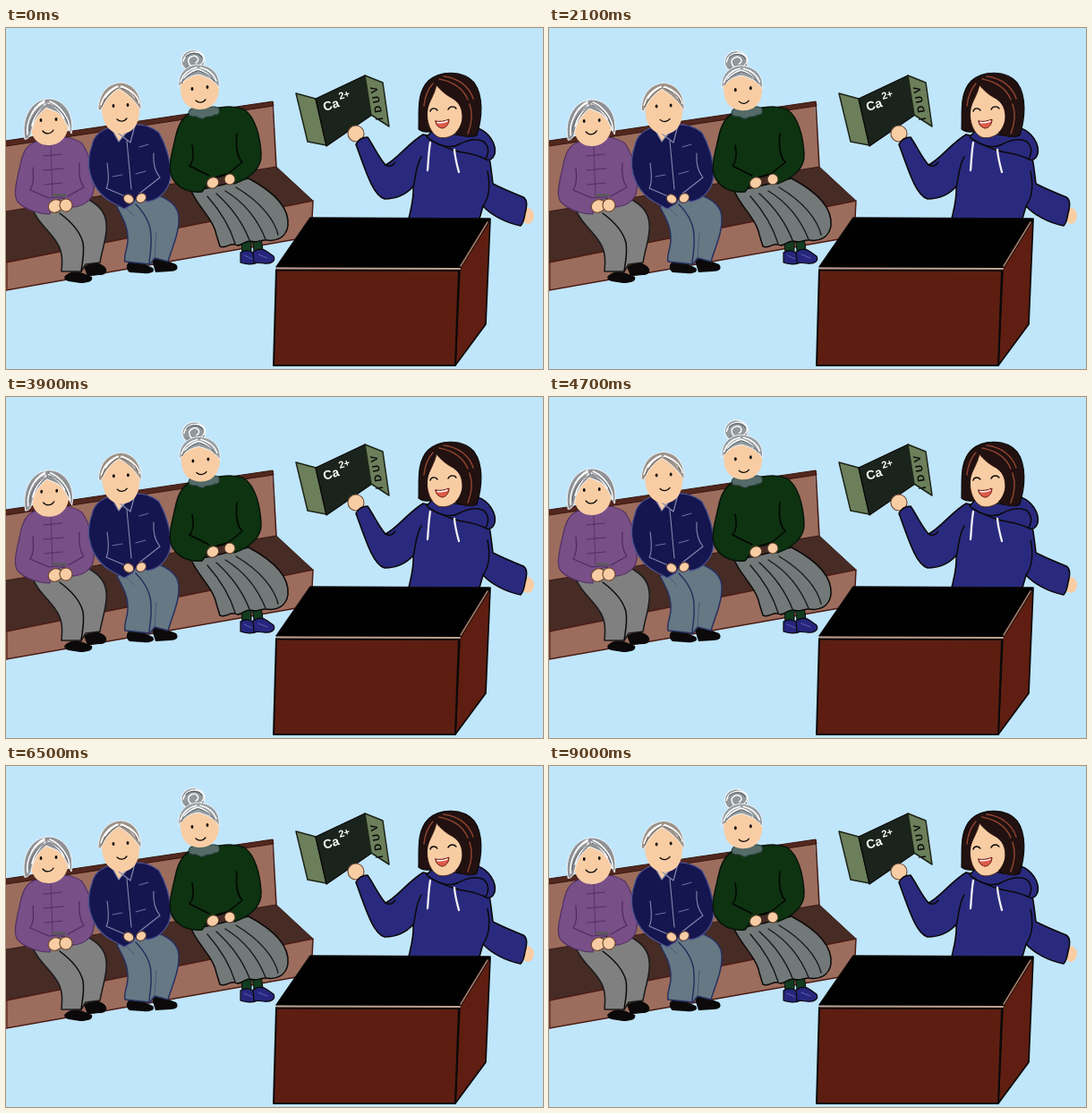
These frames come from a looping animation (600x381 px, 9.1 s). An HTML page with a canvas:

```html
<!DOCTYPE html>
<html lang="en">
<head>
<meta charset="utf-8">
<title>Talk</title>
<style>
html, body { margin: 0; width: 100%; height: 100%; overflow: hidden; background: #c0e6fc; }
canvas { display: block; width: 600px; height: 381px; }
</style>
</head>
<body>
<canvas id="stage" width="600" height="381"></canvas>
<script>
const ctx = document.getElementById('stage').getContext('2d');
const LOOP = 9100, STEP = 100, BEAT = 1075;
const SKIN = '#f9cda4', INK = '#0b0909', WOOD = '#9c6d5d', SEAT = '#472b25', OLIVE = '#6b7f5b';
const NAVY = '#15154f', HOODIE = '#292a7e';

const cache = {};
const path = d => cache[d] || (cache[d] = new Path2D(d));

function shape(d, fill, ink, w = 1.5) {
  if (fill) { ctx.fillStyle = fill; ctx.fill(path(d)); }
  if (ink) { ctx.strokeStyle = ink; ctx.lineWidth = w; ctx.stroke(path(d)); }
}
const line = (d, ink = INK, w = 1.3) => shape(d, null, ink, w);

function dot(x, y, rx, ry = rx, fill = INK, ink = null, turn = 0) {
  ctx.beginPath();
  ctx.ellipse(x, y, rx, ry, turn, 0, 7);
  ctx.fillStyle = fill;
  ctx.fill();
  if (ink) { ctx.strokeStyle = ink; ctx.lineWidth = 1.2; ctx.stroke(); }
}

// Rises from a to peak b, falls back at c, zero elsewhere
function bump(u, a, b, c) {
  if (u < a || u > c) return 0;
  return u < b ? (u - a) / (b - a) : (c - u) / (c - b);
}

function shifted(x, y, draw) {
  ctx.save();
  ctx.translate(x, y);
  draw();
  ctx.restore();
}

function bench() {
  shape('M0,129 L297,85 L302,156 L0,207Z', WOOD);
  shape('M0,126 L298,82 L299,87 L0,132Z', '#52281f', '#38160f', 1);
  line('M298,83 L302,156', '#4a1c14', 1.6);
  shape('M0,205 L302,155 L343,193 L0,262Z', SEAT, '#391a14', 1);
  shape('M0,262 L343,193 L341,233 L0,293Z', WOOD);
  line('M0,262 L343,193 L341,233 L0,293', '#4d1c15', 1.5);
  line('M1,262 L1,292', '#572019', 1.2);
}

function bodyLeft() {
  shape('M66,277 C71,272 78,271 86,274 L96,278 C98,283 91,285 83,285 L70,283 C66,282 64,279 66,277Z', INK);
  shape('M87,267 C94,262 101,261 106,264 C115,268 114,276 105,276 L91,277Z', INK);
  shape('M29,200 C34,216 47,225 55,237 C64,249 63,261 62,272 L84,272 L89,264 L105,262 C108,244 114,231 112,218 C111,205 103,198 93,192 L60,190Z', '#808081', '#1c1c1c', 1.6);
  line('M60,207 C75,218 83,228 86,240 C88,252 85,263 84,272', INK, 1.5);
  shape('M34,127 C22,130 18,141 15,157 C11,174 8,188 13,194 C22,204 39,208 49,208 L52,193 L65,190 L71,200 C84,201 97,193 98,181 C100,166 95,144 85,129 C80,125 73,123 66,122 L45,131Z', '#784f87', '#513063', 1.2);
  line('M30,156 C31,168 31,175 27,181 L48,190 M82,151 C81,164 83,173 87,178 L69,188 M48,190 L66,188', '#4d2a60', 1.2);
  line('M50,131 L52,188', '#5a346b', 1);
  line('M42,143 L62,141 M42,159 L64,157 M43,175 L63,173', '#53305f', 1.2);
  dot(55, 199, 8, 7, SKIN, '#70472f', -.5);
  dot(67, 198, 7, 7, SKIN, '#70472f', .4);
  line('M53,187 L66,187', '#5a5a5a', 3);
}

function headLeft() {
  shape('M28,105 C26,120 34,131 47,131 C61,131 70,121 70,105 C64,94 53,88 45,88 C37,90 30,97 28,105Z', SKIN);
  shape('M21,124 C16,100 29,80 47,79 C66,79 77,98 73,118 C69,112 67,101 57,94 L45,89 C36,96 30,105 28,118 C26,123 23,125 21,124Z', '#8f9195', '#f3f6f7', 1);
  line('M24,119 C22,104 31,88 43,83 M29,109 C32,97 38,90 44,85 M71,113 C71,101 61,87 49,82 M65,101 C61,93 54,87 47,84 M27,100 C30,91 36,85 43,81', '#fff', 1.5);
  line('M26,115 C26,104 33,94 42,87 M69,107 C66,96 57,88 48,85', '#63676b', 1);
  dot(39, 103, 1.4, 2);
  dot(56, 102, 1.4, 2);
  line('M41,115 C44,119 50,119 53,114', INK, 1.3);
}

function bodyMiddle() {
  shape('M137,262 C143,258 151,259 157,265 L164,268 C168,273 160,275 153,274 L138,273 C134,270 134,265 137,262Z', INK);
  shape('M163,260 C168,256 176,257 182,261 L190,264 C194,269 190,272 183,272 L167,273Z', INK);
  shape('M124,200 C130,211 136,222 136,234 C137,245 131,253 133,261 L161,264 L166,257 L181,261 C186,244 194,228 193,211 C192,199 184,193 173,188 L139,190Z', '#667884', '#28305f', 1.5);
  line('M145,197 C155,207 162,220 162,233 C163,247 160,256 160,264', '#28305f', 1.5);
  line('M168,229 L166,257 M133,200 L143,210', '#465678', 1);
  shape('M116,111 C104,115 98,121 96,131 C92,142 91,152 94,163 C98,178 106,188 119,195 L132,202 L141,197 L148,188 L158,194 C173,192 184,178 184,163 C184,147 178,129 171,117 C163,110 151,107 143,108 L130,119Z', NAVY, '#4b518e', 1.3);
  shape('M117,110 L126,127 L143,108Z', SKIN);
  line('M117,111 L126,127 L132,119 L144,109 L139,128 L126,118', '#8489af', 1.2);
  line('M135,126 L140,180 M113,151 C115,165 115,174 112,179 L133,188 M165,140 C164,154 167,161 172,167 L149,185', '#8489af', 1.1);
  line('M149,133 L159,130 M119,166 L130,164 M145,163 L156,160', '#686e9e', 1.1);
  dot(137, 191, 6, 5, SKIN, '#4f3940', .5);
  dot(151, 190, 6, 5, SKIN, '#4f3940', -.6);
}

function headMiddle() {
  shape('M107,88 C107,108 116,118 129,118 C142,118 150,107 149,88 C146,76 138,69 129,68 C118,69 110,77 107,88Z', SKIN);
  shape('M103,91 C104,71 115,62 128,61 C142,62 151,73 151,91 C147,89 145,79 126,68 C117,73 110,82 106,92Z', '#9b9289', '#eef1ef', 1);
  line('M106,86 C109,75 117,68 125,65 M111,78 C115,71 120,68 125,66 M149,84 C147,76 140,69 129,65 M144,78 C140,71 135,68 128,66', '#fff', 1.4);
  line('M107,88 C111,78 117,71 125,67 M147,82 C143,74 137,70 129,67', '#6d6056', 1);
  dot(120, 87, 1.4, 2);
  dot(136, 86, 1.4, 2);
  line('M124,102 C127,105 132,105 135,101', INK, 1.3);
}

function bodyRight() {
  shape('M262,235 L264,250 L274,251 L274,235Z M275,234 L277,249 L287,248 L285,234Z', '#123d20', INK, 1);
  shape('M262,251 C267,247 274,249 279,253 L281,262 C276,265 267,264 262,262Z', '#25267c', INK, 1.2);
  shape('M276,250 C282,246 287,246 292,250 L299,255 C302,261 295,264 288,263 L277,262Z', '#25267c', INK, 1.2);
  line('M266,254 L275,258 M282,253 L292,257', '#5b5fb2', 1);
  shape('M207,182 C214,199 232,214 235,231 L239,244 C246,247 250,240 256,242 C262,246 266,237 273,238 C280,241 285,236 291,237 C302,239 313,234 315,221 C317,201 299,183 271,168 L230,178Z', '#727978', INK, 1.5);
  line('M225,188 C239,204 250,221 256,241 M235,185 C254,202 265,219 272,237 M245,182 C268,196 282,216 290,236 M257,178 C284,194 300,214 304,231', '#151818', 1.4);
  shape('M212,91 C197,98 192,109 189,124 C185,142 180,157 186,168 C194,181 207,184 219,183 L230,168 L249,164 L255,174 C270,169 286,158 285,141 C284,120 278,99 266,91 C257,87 247,88 238,89 L222,98Z', '#0e3311', '#061509', 1.5);
  line('M208,131 C211,146 208,151 205,154 L227,165 M258,118 C256,136 260,146 264,150 L248,163 M229,168 L247,163', '#020502', 1.5);
  dot(231, 173, 7, 6, SKIN, '#4f3828', -.5);
  dot(250, 169, 6, 6, SKIN, '#4f3828', .5);
  shape('M205,92 C209,87 214,90 219,89 C226,90 230,86 237,89 C240,93 238,98 233,97 C229,101 225,97 221,101 C217,103 214,98 210,99 C204,99 203,95 205,92Z', '#546b68', '#283d39', 1.1);
}

function headRight() {
  shape('M195,64 C194,82 203,91 217,91 C231,91 239,80 238,63 C232,55 222,50 215,50 C205,51 197,56 195,64Z', SKIN);
  dot(209, 36.5, 13, 12, '#92999d', '#eef3f5', -.1);
  line('M198,37 C200,27 213,24 219,30 C224,35 219,43 212,43 C204,44 201,35 207,32 C213,29 218,36 212,39', '#fff', 1.4);
  line('M202,43 C207,47 217,45 220,40 M201,32 C206,27 215,27 219,33', '#596167', 1.1);
  shape('M193,66 C191,50 203,41 214,41 C229,41 240,51 238,67 C234,59 226,55 215,52 C206,53 198,58 193,66Z', '#969da1', '#eef3f5', 1);
  line('M195,60 C198,51 204,46 213,44 M199,56 C203,51 208,48 214,46 M235,59 C232,51 225,46 217,44 M228,55 C225,50 220,48 215,46', '#fff', 1.5);
  line('M196,62 C200,54 207,50 214,48 M233,60 C228,53 222,50 216,48', '#596167', 1);
  dot(208, 68, 1.4, 2.1);
  dot(225, 66, 1.4, 2.1);
  line('M212,81 C215,84 220,84 223,80', INK, 1.3);
}

function label(text, x, y, turn, size) {
  ctx.save();
  ctx.translate(x, y);
  ctx.rotate(turn);
  ctx.font = `bold ${size}px "Liberation Sans", Arial, sans-serif`;
  ctx.fillText(text, 0, 0);
  ctx.restore();
}

function carton() {
  shape('M324,73 L346,79 L358,131 L337,127Z', OLIVE, '#1d2418', 1.5);
  shape('M346,79 L401,53 L409,97 L358,132Z', '#1b241c', INK, 1.3);
  shape('M401,53 L421,61 L428,110 L408,97Z', OLIVE, '#1d2418', 1.5);
  ctx.fillStyle = '#fff';
  label('Ca', 356, 93, -.3, 14);
  label('2+', 373, 80, -.3, 11);
  ctx.fillStyle = INK;
  ctx.textAlign = 'center';
  [...'iDUV'].forEach((c, i) => label(c, 421 - i * 2, 101 - i * 10.8, -1.73, 11));
  ctx.textAlign = 'left';
}

function speaker() {
  dot(391, 118, 9, 9, SKIN, '#76523d');
  dot(583, 210, 7, 9, SKIN);
  shape('M391,130 C394,124 399,122 404,122 C411,132 416,144 424,153 C437,147 449,129 466,119 L500,126 L535,124 C541,142 542,158 544,174 C556,180 568,185 578,189 C583,192 582,200 580,207 C579,214 577,219 575,221 C559,218 542,209 533,199 L529,213 L450,213 C453,200 456,190 455,177 C447,186 435,191 423,191 C410,187 402,160 391,130Z', HOODIE, INK, 1.6);
  line('M455,178 C458,166 458,153 464,144 M533,199 C540,189 541,174 538,160 M424,153 C429,156 432,154 435,150', INK, 1.5);
  shape('M517,111 C530,109 543,120 546,133 C548,143 542,149 537,147 C522,139 508,140 499,136 C488,132 477,128 470,122 L476,115 L509,120Z', HOODIE, INK, 1.6);
  line('M473,124 C483,132 498,135 506,130 C516,125 526,123 534,127 C539,132 540,139 536,146', INK, 1.5);
  line('M474,128 C472,140 472,149 471,159 M501,136 C502,147 504,153 506,161', '#f0f0f3', 2.3);
}

function speakerHead() {
  shape('M461,113 C462,96 458,73 472,59 C485,47 511,47 523,61 C534,76 532,101 526,120 C519,123 508,121 501,117 L477,115 C471,117 465,116 461,113Z', '#211110', INK, 1.2);
  shape('M470,91 C470,106 474,117 483,122 C493,125 504,119 509,109 C512,98 509,84 500,79 C493,76 486,70 481,64 C479,74 473,82 470,91Z', SKIN, '#4a2a20', 1);
  shape('M480,60 C478,75 470,86 471,99 C471,107 469,115 461,113 C465,97 462,77 471,65Z', '#211110');
  shape('M480,60 C486,74 502,77 508,88 C512,98 509,110 502,117 C512,123 523,122 525,119 C531,102 531,81 521,66Z', '#211110');
  line('M477,62 C470,70 468,78 467,87 M484,57 C500,60 511,68 516,80 M489,54 C506,56 518,66 522,79 M518,85 C522,97 520,108 516,118', '#8d432f', 1.5);
  line('M474,93 C475,89 480,89 482,92 M494,91 C496,87 501,87 503,90', INK, 1.4);
  shape('M480,104 C485,105 490,104 495,102 C495,108 491,112 487,112 C483,111 480,108 480,104Z', '#dd5a48', '#651a18', 1);
  line('M482,105.5 C486,106 490,105.5 493,104', '#fff', 1.5);
}

function counter() {
  shape('M340,212 L541,213 L507,269 L302,267Z', '#010101', INK, 1.5);
  shape('M507,269 L541,214 L536,331 L502,377Z', '#5f1e11', INK, 1.7);
  shape('M302,270 L506,270 L502,377 L299,377Z', '#5d1e11', INK, 2);
  line('M303,268.5 L507,269', '#bda091', 2);
  line('M508,266 L538,217', '#a47b69', 1.6);
  line('M302,271 L505,271.5', INK, 1.2);
}

function draw(t) {
  const u = (t % BEAT) / BEAT;
  const nod = bump(u, .22, .8, 1);
  const dip = bump(u, .04, .21, .38);
  ctx.fillStyle = '#c0e6fc';
  ctx.fillRect(0, 0, 600, 381);
  bench();
  bodyLeft();
  bodyMiddle();
  bodyRight();
  shifted(nod, nod * 4, headLeft);
  shifted(nod * .5, nod * 1.7, headMiddle);
  shifted(nod * 1.3, nod * 5, headRight);
  carton();
  speaker();
  shifted(-1.6 * dip, 2.2 * dip, speakerHead);
  counter();
}

ctx.lineJoin = ctx.lineCap = 'round';
const start = performance.now();
function tick() {
  const t = (performance.now() - start) % LOOP;
  draw(Math.floor(t / STEP) * STEP);
  requestAnimationFrame(tick);
}
draw(0);
requestAnimationFrame(tick);
</script>
</body>
</html>
```
